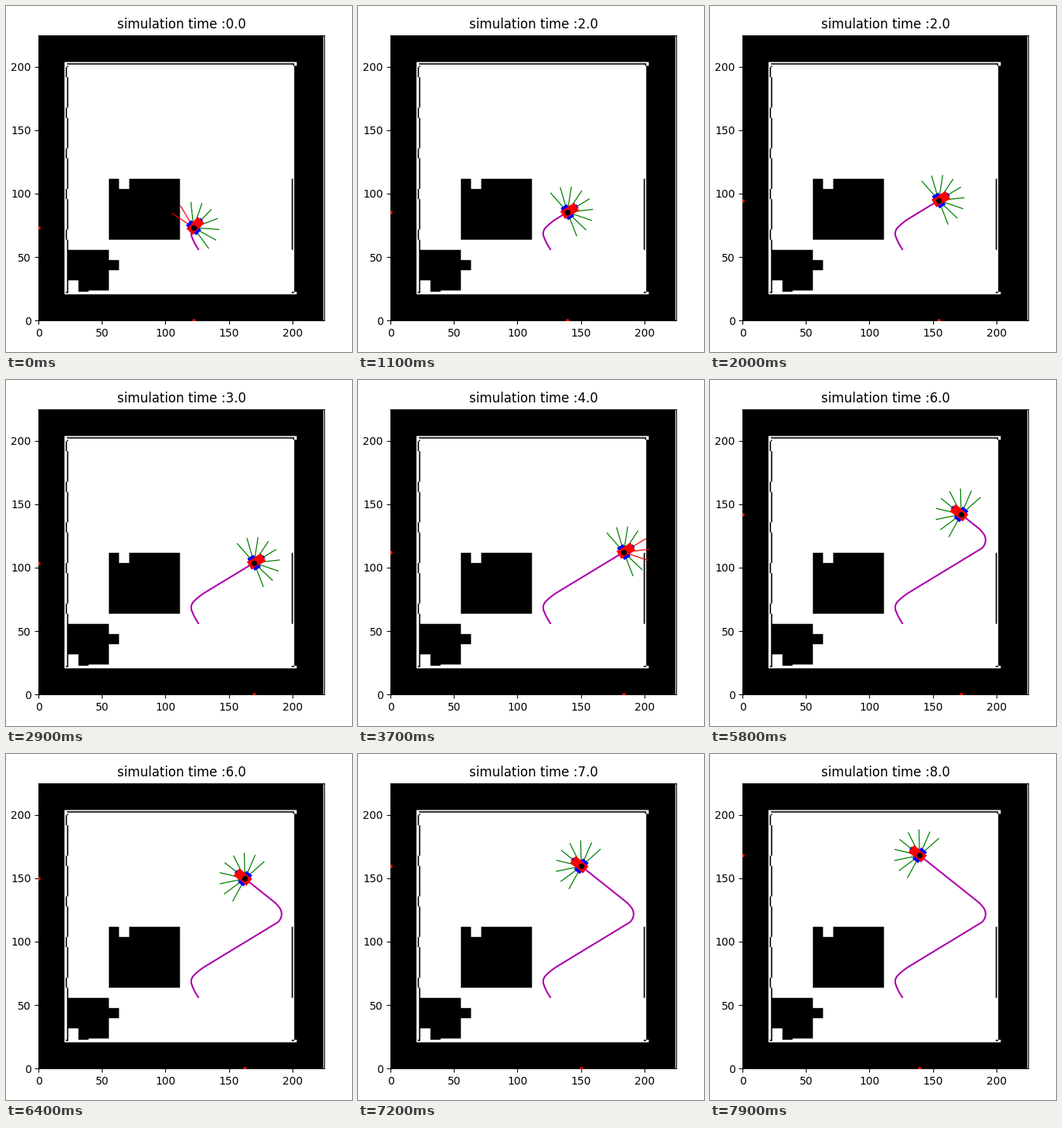
A matplotlib script for the animation above (8000 ms loop, 448x448 px).

```python
import numpy as np
import matplotlib.pyplot as plt
from matplotlib.animation import FuncAnimation
from matplotlib.patches import Polygon

STEP = 100
FRAMES = 80
REACH = 20
RAY_ANGLES = np.radians(np.arange(100, -101, -25))

# Times (ms) at which the rounded clock in the title advances
CLOCK = [200, 1100, 2200, 3200, 4300, 5400, 6500, 7600]
# Distance driven over time, with two short pauses
TIMES = [0, 100, 1100, 2900, 4600, 5600, 5700, 5800, 6400, 7900]
DIST = [18.8, 18.8, 40.0, 75.6, 110.2, 131.5, 131.5, 133.6, 145.9, 175.4]
# Heading (degrees) over distance
TURN_AT = [0, 11.3, 18.8, 30.8, 96.2, 110.2, 117.2, 180]
HEADING = [125, 110, 46, 31.2, 31.2, 126, 141.5, 141.5]

DS = 0.1
s_path = np.arange(0, 180, DS)
h_mid = np.radians(np.interp(s_path + DS / 2, TURN_AT, HEADING))
x_path = 125.9 + np.concatenate(([0], np.cumsum(np.cos(h_mid[:-1]) * DS)))
y_path = 56.2 + np.concatenate(([0], np.cumsum(np.sin(h_mid[:-1]) * DS)))


def build_map():
    """Occupancy grid indexed [y, x]; 1 is free, 0 is blocked."""
    g = np.zeros((225, 225))

    def fill(x0, x1, y0, y1, value=0):
        g[y0:y1, x0:x1] = value

    fill(21, 202, 21, 204, 1)
    fill(202, 204, 201, 204, 1)
    fill(202, 204, 21, 23, 1)
    # thin inner walls, the left one jagged
    fill(23, 201, 202, 203)
    fill(201, 202, 201, 203)
    fill(200, 201, 56, 112)
    fill(200, 202, 22, 23)
    fill(22, 24, 22, 23)
    fill(23, 24, 23, 56)
    for y in range(56, 201):
        g[y, 22 if y % 32 < 8 else 23] = 0
    # central block with a notch
    fill(56, 112, 64, 112)
    fill(64, 72, 104, 112, 1)
    # corner block
    fill(23, 56, 32, 56)
    fill(32, 40, 23, 32)
    fill(40, 56, 24, 32)
    fill(56, 64, 40, 48)
    return g


grid = build_map()

fig = plt.figure(figsize=(4.48, 4.48), dpi=100, facecolor="white")
ax = fig.add_axes([42.2 / 448, 40.8 / 448, 369.6 / 448, 369.6 / 448])
ax.imshow(grid, cmap="gray", vmin=0, vmax=1, origin="lower", aspect="auto")
ax.set_xlim(0, 225)
ax.set_ylim(0, 225)
ax.set_xticks(range(0, 201, 50))
ax.set_yticks(range(0, 201, 50))
title = ax.set_title("", fontsize=12)

trail, = ax.plot([], [], color="#ac00ac", lw=1.5, zorder=3)
rays = [ax.plot([], [], lw=0.9, zorder=4)[0] for _ in RAY_ANGLES]


def box(x0, x1, y0, y1):
    return np.array([(x0, y0), (x1, y0), (x1, y1), (x0, y1)])


# Robot parts in its own frame: x forward, y left
PARTS = [
    (box(7, 9.3, -1.5, 1.5), "blue"),
    (box(-4.5, 8.5, -3.6, 3.6), "red"),
    (box(-2.9, 2.9, 3.3, 5.6), "blue"),
    (box(-2.9, 2.9, -5.6, -3.3), "blue"),
]
bodies = [ax.add_patch(Polygon(shape, closed=True, fc=color, ec="none", zorder=5))
          for shape, color in PARTS]
hub, = ax.plot([], [], "k.", ms=8.5, zorder=6)
marks, = ax.plot([], [], "r.", ms=4.5, zorder=3)


def blocked(x, y, angle):
    r = np.arange(0, REACH + 2, 0.5)
    cols = np.rint(x + r * np.cos(angle)).astype(int).clip(0, 224)
    rows = np.rint(y + r * np.sin(angle)).astype(int).clip(0, 224)
    return (grid[rows, cols] == 0).any()


def draw(i):
    t = i * STEP
    s = np.interp(t, TIMES, DIST)
    x = np.interp(s, s_path, x_path)
    y = np.interp(s, s_path, y_path)
    h = np.radians(np.interp(s, TURN_AT, HEADING))

    title.set_text(f"simulation time :{sum(t >= c for c in CLOCK):.1f}")
    past = s_path < s
    trail.set_data(np.append(x_path[past], x), np.append(y_path[past], y))

    for ray, offset in zip(rays, RAY_ANGLES):
        a = h + offset
        ray.set_data([x, x + REACH * np.cos(a)], [y, y + REACH * np.sin(a)])
        ray.set_color("red" if blocked(x, y, a) else "green")

    c, sn = np.cos(h), np.sin(h)
    rot = np.array([[c, sn], [-sn, c]])
    for body, (shape, _) in zip(bodies, PARTS):
        body.set_xy(shape @ rot + (x, y))
    hub.set_data([x], [y])
    marks.set_data([x, 0], [0, y])
    return [title, trail, hub, marks, *rays, *bodies]


anim = FuncAnimation(fig, draw, frames=FRAMES, interval=STEP,
                     repeat=True, repeat_delay=0, blit=False)
plt.show()
```
